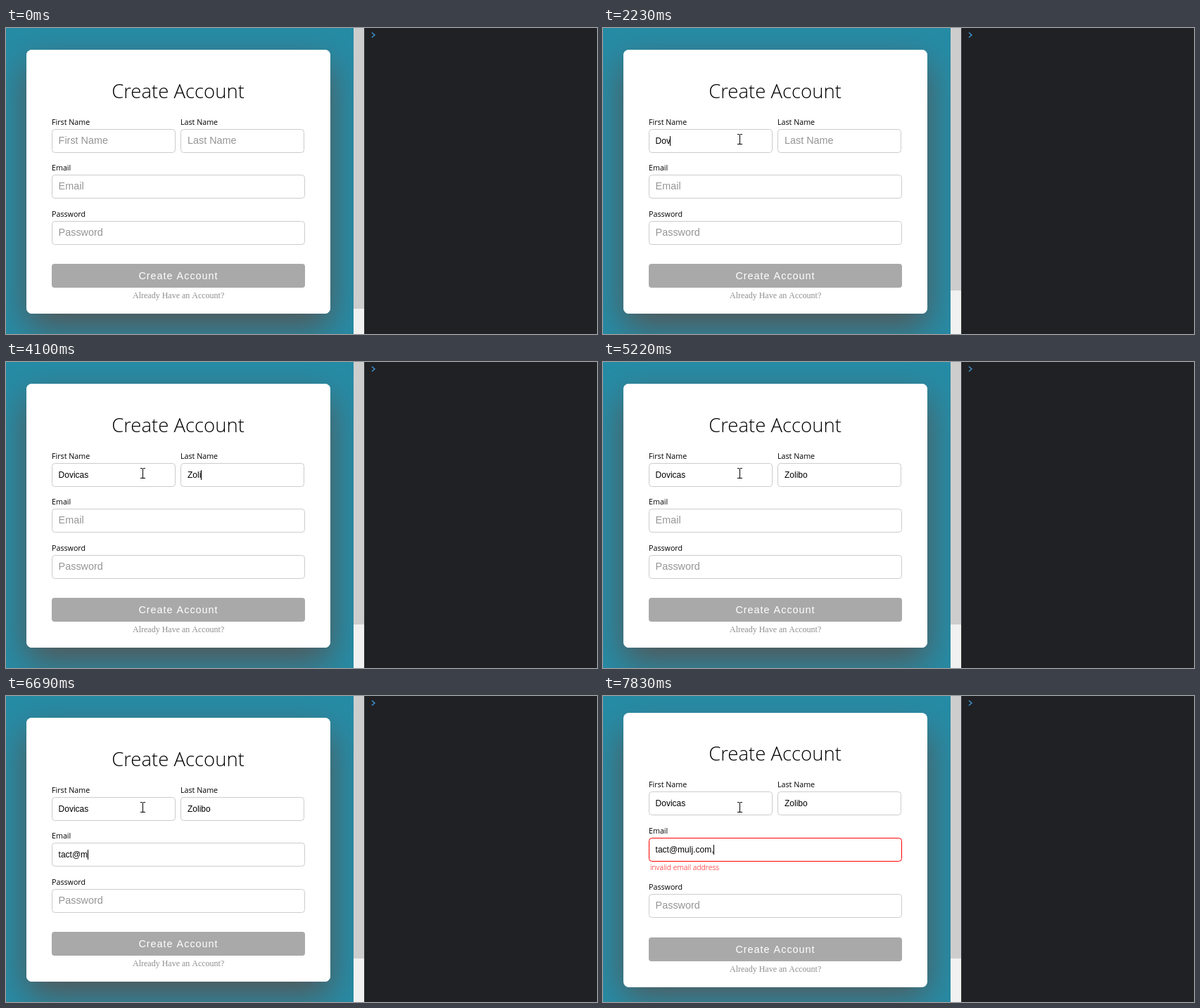
An HTML page with a canvas that plays this animation: 840 px wide and 436 px high, repeating every 8000 ms.

```html
<!DOCTYPE html>
<html lang="en">
<head>
<meta charset="utf-8">
<title>Create Account form</title>
<style>
  html, body { margin: 0; width: 100%; height: 100%; overflow: hidden; background: #268ca6; }
  canvas { display: block; }
</style>
</head>
<body>
<canvas id="stage" width="840" height="436"></canvas>
<script>
const ctx = document.getElementById('stage').getContext('2d');
const LOOP = 8000, BLINK = 530, ERROR_HEIGHT = 15;
const SANS = '"Liberation Sans", Arial, sans-serif';
const UI = '"Open Sans", "Noto Sans", sans-serif';
const SERIF = '"Liberation Serif", Times, serif';

const longEnough = text => text.length >= 3;
const isEmail = text => /^[\w.]+@[\w-]+(\.[\w-]+)*$/.test(text);

// keys: the moment each character of `text` is typed
const fields = [
  { row: 0, x: 65, w: 176, textX: 74.6, y: 143.9, label: 'First Name', error: 'invalid first name',
    text: 'Dovicas', focus: 1170, blur: 3100, valid: longEnough,
    keys: [1900, 2100, 2230, 2300, 2500, 2570, 2630] },
  { row: 0, x: 248, w: 176, textX: 258, y: 143.9, label: 'Last Name', error: 'invalid last name',
    text: 'Zolibo', focus: 3100, blur: 4690, valid: longEnough,
    keys: [3570, 3770, 3900, 4100, 4230, 4360] },
  { row: 1, x: 65, w: 360, textX: 74.6, y: 209.2, label: 'Email', error: 'invalid email address',
    text: 'tact@mulj.com,', focus: 4690, blur: LOOP, valid: isEmail,
    keys: [5750, 5820, 6020, 6090, 6360, 6690, 6760, 6890, 7110, 7370, 7500, 7500, 7570, 7830] },
  { row: 2, x: 65, w: 360, textX: 74.6, y: 274.6, label: 'Password', error: '',
    text: '', focus: LOOP, blur: LOOP, valid: longEnough, keys: [] }
];

function rect(x, y, w, h, color) {
  ctx.fillStyle = color;
  ctx.fillRect(x, y, w, h);
}

function roundRect(x, y, w, h, radius) {
  ctx.beginPath();
  ctx.roundRect(x, y, w, h, radius);
}

function write(text, x, y, font, color, align = 'left') {
  ctx.font = font;
  ctx.fillStyle = color;
  ctx.textAlign = align;
  ctx.fillText(text, x, y);
}

function drawBackdrop(t) {
  rect(0, 0, 494, 436, '#268ca6');
  ctx.save();
  ctx.beginPath();
  ctx.rect(0, 0, 494, 436);
  ctx.clip();
  ctx.shadowColor = '#555';
  ctx.shadowBlur = 50;
  ctx.shadowOffsetY = 20;
  ctx.fillStyle = '#fff';
  roundRect(29, 31, 432, 376, 8);
  ctx.fill();
  ctx.restore();

  rect(494, 0, 15, 436, '#f1f1f1');
  rect(494, 0, 15, t < 1900 ? 400 : 374, '#cdcdcd');
  rect(509, 0, 331, 436, '#202124');
  rect(509, 0, 1, 436, '#35363a');
  ctx.strokeStyle = '#3d94d1';
  ctx.lineWidth = 1.5;
  ctx.beginPath();
  ctx.moveTo(520, 6.5);
  ctx.lineTo(524, 10);
  ctx.lineTo(520, 13.5);
  ctx.stroke();
}

function drawField(field, t, shift) {
  const { x, w, textX, typed, bad } = field;
  const y = Math.round(field.y + shift);
  write(field.label, x, y - 6, `10.7px ${UI}`, '#000');

  roundRect(x + 0.5, y + 0.5, w - 1, 33, 4);
  ctx.lineWidth = 1;
  ctx.strokeStyle = bad ? '#f00' : '#ccc';
  ctx.stroke();

  if (typed) write(typed, textX, y + 21, `12px ${SANS}`, '#000');
  else write(field.label, textX, y + 21, `14.4px ${SANS}`, '#959595');
  if (bad) write(field.error, x + 2, y + 46, `300 10.5px ${UI}`, '#f00');

  if (t >= field.focus && t < field.blur) {
    const last = Math.max(field.focus, ...field.keys.filter(k => k <= t));
    if (Math.floor((t - last) / BLINK) % 2 === 0) {
      ctx.font = `12px ${SANS}`;
      rect(Math.floor(textX + ctx.measureText(typed).width), y + 10, 1, 14, '#000');
    }
  }
}

function drawForm(t) {
  for (const field of fields) {
    field.typed = field.text.slice(0, field.keys.filter(k => k <= t).length);
    field.bad = field.typed !== '' && !field.valid(field.typed);
  }
  const failing = fields.find(field => field.bad);
  const half = failing ? ERROR_HEIGHT / 2 : 0;
  const top = Math.round(31.4 - half), bottom = Math.round(407.2 + half);

  ctx.fillStyle = '#fff';
  roundRect(29, top, 432, bottom - top, 8);
  ctx.fill();
  write('Create Account', 244.5, Math.round(99.9 - half), `300 27.5px ${UI}`, '#000', 'center');

  for (const field of fields) {
    drawField(field, t, failing && field.row > failing.row ? half : -half);
  }

  const buttonY = Math.round(336.2 + half);
  ctx.fillStyle = '#a9a9a9';
  roundRect(65, buttonY, 360, 34, 4);
  ctx.fill();
  ctx.letterSpacing = '1px';
  write('Create Account', 188.4, buttonY + 22, `14.4px ${SANS}`, '#fff');
  ctx.letterSpacing = '0px';
  write('Already Have an Account?', 180, buttonY + 49, `12px ${SERIF}`, '#8f8f8f');
}

function pointerAt(t) {
  if (t >= 1240) return [194, 158];
  if (t >= 1170) return [198, 157];
  if (t >= 1100) return [184, 153];
  const step = Math.min(11, Math.floor((t - 260) / 70)) / 11;
  const p = step * step * (3 - 2 * step);
  return [397 - 234 * p, 428 - 266 * p].map(Math.round);
}

function drawPointer(t) {
  if (t < 260) return;
  const [x, y] = pointerAt(t);
  const overInput = fields.some(f => x >= f.x && x < f.x + f.w && y >= f.y && y < f.y + 34);
  if (overInput) {
    rect(x, y - 6, 1, 14, '#000');
    for (const edge of [y - 7, y + 7]) {
      rect(x - 3, edge, 3, 1, '#000');
      rect(x + 1, edge, 3, 1, '#000');
    }
    return;
  }
  ctx.save();
  ctx.translate(x + 0.5, y + 0.5);
  ctx.beginPath();
  [[0, 0], [0, 16], [4, 12.5], [6.5, 18], [9, 17], [6.5, 11.5], [11.5, 11.5]]
    .forEach(point => ctx.lineTo(...point));
  ctx.closePath();
  ctx.fillStyle = '#fff';
  ctx.strokeStyle = '#000';
  ctx.lineWidth = 1;
  ctx.fill();
  ctx.stroke();
  ctx.restore();
}

let start;
function frame(now) {
  start ??= now;
  const t = (now - start) % LOOP;
  drawBackdrop(t);
  drawForm(t);
  drawPointer(t);
  requestAnimationFrame(frame);
}
requestAnimationFrame(frame);
</script>
</body>
</html>
```
